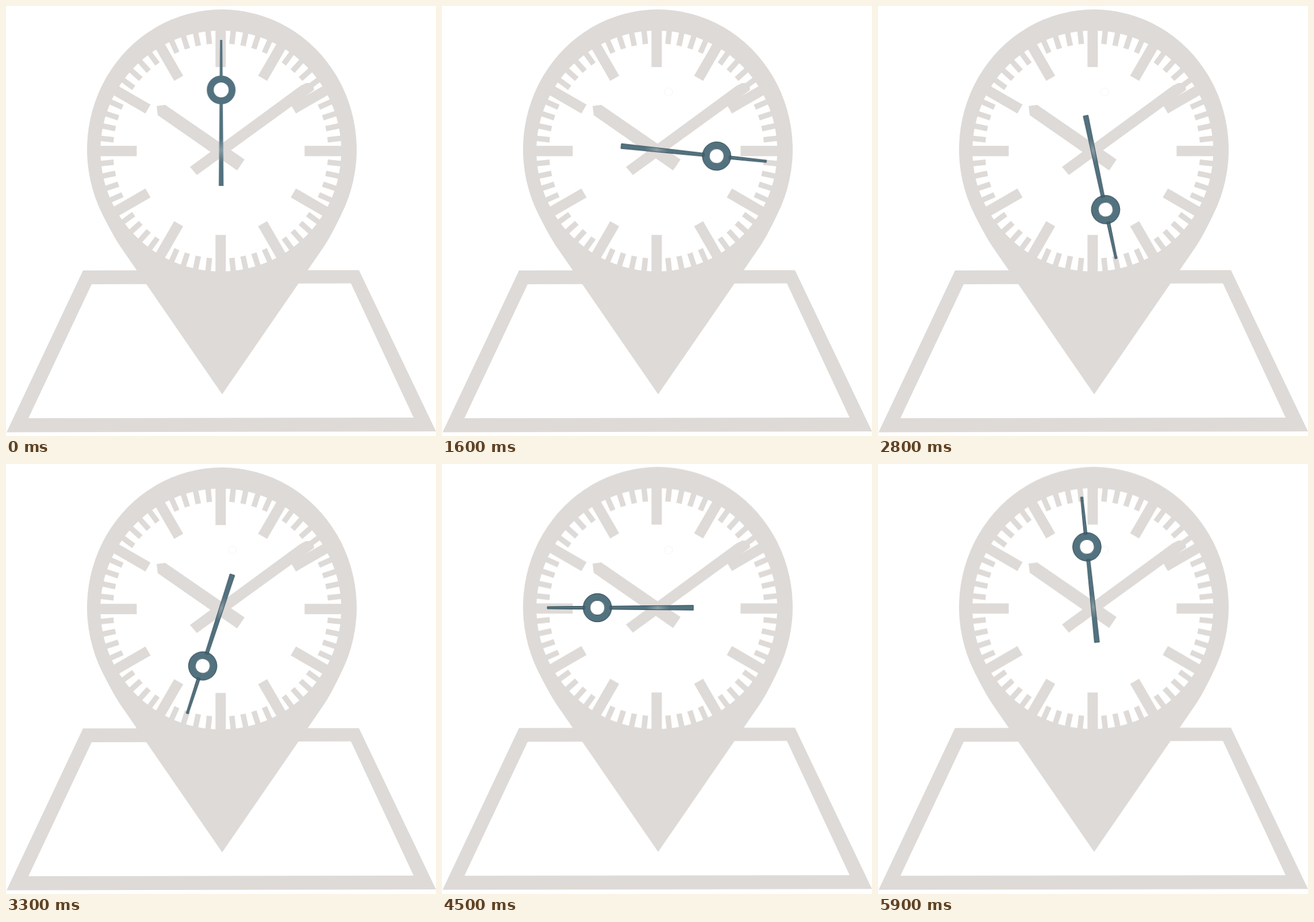
An HTML page that plays this animation: 748x748 px, repeating every 6 s.

```html
<!DOCTYPE html>
<html lang="en">
<head>
<meta charset="utf-8">
<title>Clock pin</title>
<style>
  @property --a { syntax: '<angle>'; inherits: true; initial-value: 0deg; }

  html, body { margin: 0; width: 100%; height: 100%; overflow: hidden; background: #fff; }
  svg { display: block; width: 100%; height: 100%; }

  .base { fill: #dedad7; animation: nudge 6s step-end infinite; }
  .white { fill: #fff; }
  .ticks { stroke: #dedad7; }
  .ghost { fill: none; stroke: #f5f4f3; animation: appear 6s step-end infinite; }

  .seat { animation: seat 6s step-end infinite; }
  .hand {
    animation: turn 6s steps(60) infinite;
    transform: translate(calc(374.3px + 104px * sin(var(--a))),
                         calc(250px - 106.5px * cos(var(--a))))
               rotate(var(--a));
  }
  .edge { fill: none; stroke: #2f4853; animation: appear 6s step-end infinite; }

  @keyframes turn { from { --a: 0deg; } to { --a: 360deg; } }
  @keyframes appear { 0% { opacity: 0; } 1.6666%, 100% { opacity: 1; } }
  @keyframes seat {
    0% { transform: translate(0, 2.5px); }
    1.6666%, 100% { transform: none; }
  }
  @keyframes nudge {
    0%, 76.6666% { transform: none; }
    75%, 98.3333%, 100% { transform: translate(0, -.8px); }
  }
</style>
</head>
<body>
<svg viewBox="0 0 748 748">
  <defs>
    <linearGradient id="steel" gradientUnits="userSpaceOnUse" x1="0" y1="84" x2="0" y2="126">
      <stop offset="0" stop-color="#52727f"/>
      <stop offset=".5" stop-color="#8499a1"/>
      <stop offset="1" stop-color="#52727f"/>
    </linearGradient>
    <path id="rod" d="M-1.9-87H1.9L2.6-22H-2.6ZM-2.8 22H2.8L4.2 167H-4.2Z"/>
  </defs>

  <g class="base">
    <path fill-rule="evenodd" d="M134 460L614 459.5 748 740 1 741.5ZM149 484L39 717 709 716 600 482.5Z"/>
    <path d="M167.5 362A234.5 243.5 0 1 1 583.5 362Q565 401 552 420L376 675.5 200 420Q187 401 167.5 362Z"/>
    <circle class="white" cx="373.7" cy="252.2" r="209.5"/>
    <g class="ticks" id="ticks" transform="translate(373.4 252.2)"/>
    <path d="M262 174L277 172 415 267 402 286 264 190Z"/>
    <path d="M320 280L512 139 522 134 534 134 536 146 332 294Z"/>
  </g>
  <circle class="ghost" cx="394" cy="149.5" r="7"/>

  <g class="seat">
    <g class="hand">
      <use href="#rod" fill="url(#steel)"/>
      <circle class="white" r="19" stroke="#52727f" stroke-width="12"/>
      <g class="edge">
        <use href="#rod"/>
        <circle r="24.6"/>
        <circle r="12.8"/>
      </g>
    </g>
  </g>
</svg>
<script>
  const ticks = document.getElementById('ticks');
  for (let i = 0; i < 60; i++) {
    const hour = i % 5 === 0;
    const line = document.createElementNS('http://www.w3.org/2000/svg', 'line');
    const attrs = {
      y1: -211,
      y2: hour ? -146 : -187,
      'stroke-width': hour ? 18 : 9.5,
      transform: `rotate(${i * 6})`
    };
    for (const key in attrs) line.setAttribute(key, attrs[key]);
    ticks.append(line);
  }
</script>
</body>
</html>
```
